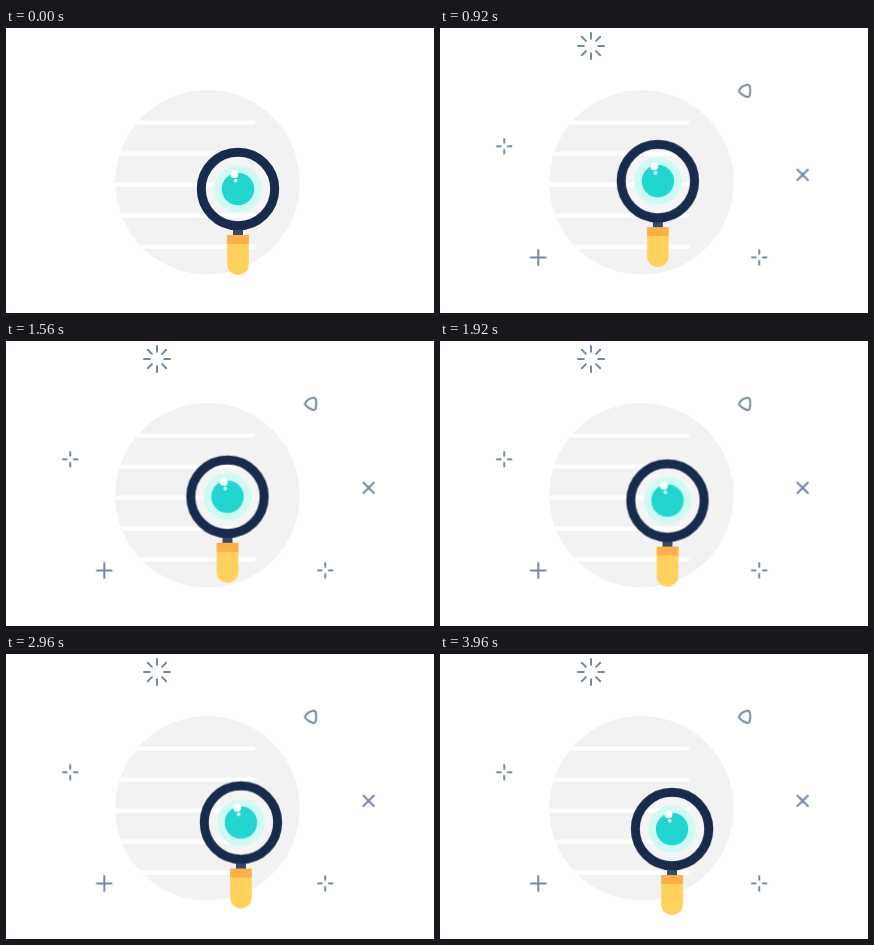
These frames come from a looping animation (428 by 285 pixels, 4000 ms). An HTML page:

```html
<!DOCTYPE html>
<html lang="en">
<head>
<meta charset="utf-8">
<title>Search</title>
<style>
  html, body { margin: 0; width: 100%; height: 100%; overflow: hidden; background: #fff; }
  svg { display: block; width: 100%; height: 100%; }
</style>
</head>
<body>
<svg viewBox="0 0 428 285">
  <defs>
    <clipPath id="disc"><circle cx="201.5" cy="154.3" r="92.3"/></clipPath>
  </defs>
  <circle cx="201.5" cy="154.3" r="92.3" fill="#f2f2f2"/>
  <path clip-path="url(#disc)" stroke="#fff" stroke-width="4.2" stroke-linecap="round"
    d="M100 94.6H247.3M100 125.6H247.3M100 156.6H247.3M100 187.6H247.3M100 218.6H247.3"/>
  <g id="marks" fill="none" stroke="#7488a5" stroke-width="2" stroke-linecap="round" stroke-linejoin="round"></g>
  <g id="lens">
    <rect x="-5" y="39" width="10" height="8" fill="#3b4a63"/>
    <path d="M-10.8 46H10.8V75.2A10.8 10.8 0 0 1 -10.8 75.2Z" fill="#ffd05b"/>
    <rect x="-10.8" y="46" width="21.6" height="9" fill="#fbb04c"/>
    <circle r="33" fill="#fff" fill-opacity=".2"/>
    <circle r="23.8" fill="#cffaf4"/>
    <circle r="16.2" fill="#22d6cf"/>
    <circle r="36.7" fill="none" stroke="#192b4b" stroke-width="9"/>
    <circle cx="-3.6" cy="-14.8" r="3.9" fill="#fff"/>
    <circle cx="-2.3" cy="-8.3" r="1.8" fill="#fff"/>
  </g>
</svg>
<script>
  const LOOP = 4000;
  const timing = { duration: LOOP, iterations: Infinity };

  // Rays around the origin, from radius `inner` to `outer`.
  const rays = (count, inner, outer, turn = 0) =>
    Array.from({ length: count }, (_, i) => {
      const a = turn + i * 2 * Math.PI / count;
      const at = r => `${(r * Math.cos(a)).toFixed(2)} ${(r * Math.sin(a)).toFixed(2)}`;
      return `M${at(inner)}L${at(outer)}`;
    }).join('');

  const spark = rays(4, 3.6, 7.2);
  const pebble = 'M-5.2 -1.2C-3.6 -3.8 -.8 -5.4 2.2 -5.9C4 -6.1 5 -5.2 5.2 -3.6C5.6 -1 5.5 1.6 5 4.2C4.6 5.9 3.4 6.5 1.8 6C-1 5.2 -3.2 3.8 -5 1.7C-5.9 .7 -5.9 -.1 -5.2 -1.2Z';

  // x, y, shape, moment of appearance
  const marks = [
    [151, 18, rays(8, 7.2, 13), 80],
    [64.2, 118.3, spark, 160],
    [98.3, 229.5, rays(4, 0, 7.4), 240],
    [362.6, 146.8, rays(4, 0, 7.4, Math.PI / 4), 320],
    [304.7, 62.8, pebble, 400],
    [319.2, 229.4, spark, 480]
  ];

  const layer = document.getElementById('marks');
  for (const [x, y, d, start] of marks) {
    const mark = document.createElementNS('http://www.w3.org/2000/svg', 'path');
    mark.setAttribute('d', d);
    mark.setAttribute('transform', `translate(${x} ${y})`);
    layer.append(mark);
    mark.animate([
      { opacity: 0, offset: 0, easing: 'step-end' },
      { opacity: 1, offset: start / LOOP },
      { opacity: 1, offset: 1 }
    ], timing);
  }

  // time, x, y
  const route = [
    [0, 232, 161],
    [1140, 214.5, 151.2],
    [2460, 236.4, 165.3],
    [LOOP, 231.9, 175.3]
  ];
  document.getElementById('lens').animate(
    route.map(([t, x, y]) => ({ offset: t / LOOP, transform: `translate(${x}px, ${y}px)` })),
    timing
  );
</script>
</body>
</html>
```
